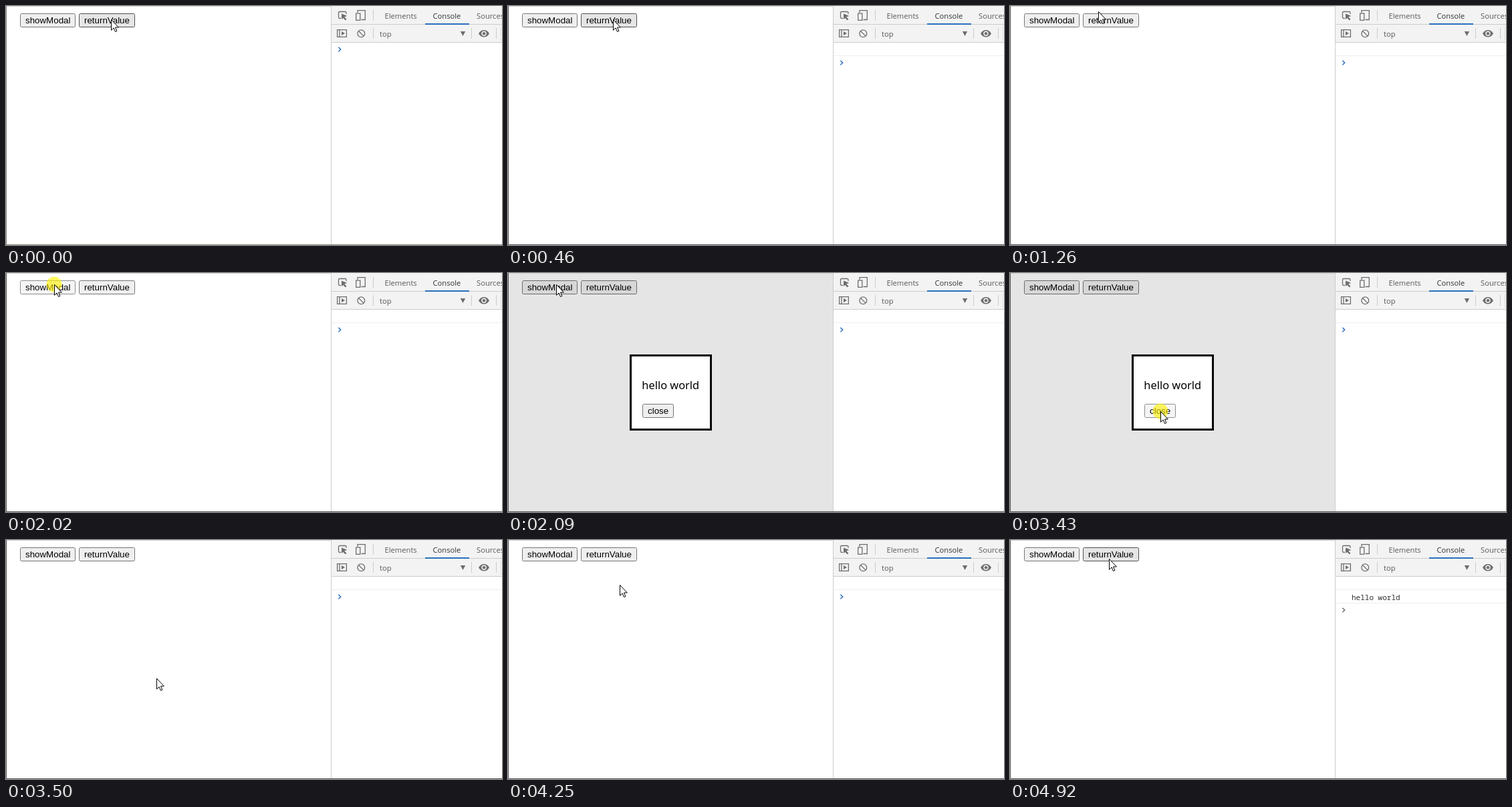
These frames come from a looping animation (742 by 358 pixels, 6.31 s). An HTML page:

```html
<!DOCTYPE html>
<html lang="en">
<head>
<meta charset="utf-8">
<title>Dialog return value</title>
<style>
  html, body { margin: 0; width: 100%; height: 100%; overflow: hidden; background: #fff; }
  svg { display: block; width: 742px; height: 358px; }
  .ui { font: 11.2px "Open Sans", "Noto Sans", sans-serif; fill: #5a5a5a; }
  .btn text { font: 13.333px "Liberation Sans", Arial, sans-serif; fill: #000; }
  .btn rect { fill: #efefef; stroke: #767676; }
  .btn.hover rect { fill: #e5e5e5; stroke: #4f4f4f; }
  .btn.active rect { fill: #f5f5f5; stroke: #8d8d8d; }
  .hello { font: 16.4px "Noto Sans", "Open Sans", sans-serif; }
  .log { font: 11px "Noto Sans Mono", "DejaVu Sans Mono", monospace; fill: #303030; }
  .icon { fill: none; stroke: #6e6e6e; stroke-width: 1.3; }
  .solid { fill: #6e6e6e; }
  .sep { stroke: #ccc; fill: none; }
</style>
</head>
<body>
<svg viewBox="0 0 742 358">
  <rect width="742" height="358" fill="#fff"/>

  <g class="btn" id="show">
    <rect x="21.5" y="11.5" width="82" height="20" rx="2"/>
    <text x="29" y="26">showModal</text>
  </g>
  <g class="btn" id="ret">
    <rect x="109.5" y="11.5" width="83" height="20" rx="2"/>
    <text x="117" y="26">returnValue</text>
  </g>

  <g id="modal">
    <rect x="1" y="1" width="485" height="356" fill="#000" opacity=".1"/>
    <rect x="183.5" y="123.5" width="120" height="111" fill="#fff" stroke="#000" stroke-width="3"/>
    <text class="hello" x="200.3" y="174">hello world</text>
    <g class="btn" id="close">
      <rect x="201.5" y="196.5" width="46" height="20" rx="2"/>
      <text x="209" y="211">close</text>
    </g>
  </g>

  <!-- developer tools -->
  <rect x="487" width="255" height="54" fill="#f3f3f3"/>
  <path class="sep" d="M487 27.5H742M487 54.5H742M486.5 0V357M549.5 6V22M549.5 33V49M696.5 33V49M733.5 33V49"/>
  <path d="M742 32.5H740.5V50.5H742" fill="#fff" stroke="#ddd"/>
  <rect x="627" y="26" width="66" height="2" fill="#2a70bd"/>
  <g class="ui">
    <text x="566.5" y="19">Elements</text>
    <text x="638.5" y="19" fill="#333">Console</text>
    <text x="704" y="19">Sources</text>
    <text x="559" y="46">top</text>
  </g>
  <path class="icon" d="M501 18.5H499Q497.5 18.5 497.5 17V10Q497.5 8.5 499 8.5H507.5Q509 8.5 509 10V12"/>
  <path class="solid" d="M502 11.5V20L504.3 18L507.8 21.5L509.5 19.8L506.2 16.4L510.3 15Z"/>
  <path class="icon" d="M526 10V6.7H537.3V20.5H531.5M523.7 11.2H529.8V21.3H523.7Z"/>
  <path class="icon" d="M495.6 35.7H509.4V46.3H495.6ZM499 35.7V46.3"/>
  <path class="solid" d="M502 38V44L507 41Z"/>
  <g class="icon" stroke-width="1.7">
    <circle cx="531.3" cy="41.3" r="5.4"/>
    <path d="M527.5 37.5L535.1 45.1"/>
  </g>
  <path class="solid" d="M679.8 38H687.2L683.5 45Z"/>
  <path class="solid" d="M707 41.2Q710 36 715 36T723 41.2Q720 46.5 715 46.5T707 41.2Z"/>
  <circle cx="715" cy="41.2" r="3.7" fill="#f3f3f3"/>
  <circle cx="715" cy="41.2" r="2.2" class="solid"/>

  <path id="row1" d="M487 74.5H742" stroke="#eee"/>
  <g id="row2">
    <path d="M487 94.5H742" stroke="#eee"/>
    <text class="log" x="511" y="90">hello world</text>
  </g>
  <path id="prompt" d="M497.3 -3.2L500.7 0L497.3 3.2" fill="none" stroke-width="1.5"/>

  <path d="M0 .5H486" stroke="#d2d2d2"/>
  <path id="edge" d="M.5 0V357.5H742" fill="none"/>

  <circle id="ring" r="11.5" fill="#fff200" opacity=".62"/>
  <path id="cursor" d="M.5 .5V16.3L4.1 12.9L6.5 18.5L8.9 17.5L6.5 12H11.4Z" fill="#fff" stroke="#000"/>
</svg>
<script>
const LOOP = 6310;
const $ = id => document.getElementById(id);
const el = {};
for (const id of ["show", "ret", "close", "modal", "row1", "row2", "prompt", "edge", "ring", "cursor"]) el[id] = $(id);

const easeOut = u => 1 - (1 - u) ** 2.9;
const smooth = u => u * u * (3 - 2 * u);

// pointer travel: start, end, number of steps, two points, sideways bow, easing
const moves = [
  { at: 1260, end: 1800, n: 9, from: [157, 20], to: [72, 17], bow: [0, -14], ease: easeOut },
  { at: 2490, end: 3030, n: 9, from: [72, 17], to: [225, 207], bow: [8, -6], ease: smooth },
  { at: 3770, end: 4390, n: 10, from: [225, 207], to: [148, 29], bow: [4, 0], ease: smooth },
  { at: 4460, end: 4460, n: 1, from: [148, 29], to: [148, 28], bow: [0, 0], ease: smooth }
];
const clicks = [[330, 400], [2020, 2090], [3430, 3500], [4790, 4860]];
const boxes = { show: [21, 11, 104, 32], ret: [109, 11, 193, 32], close: [201, 196, 248, 217] };

function pointer(t) {
  let pos = moves[0].from;
  for (const m of moves) {
    if (t < m.at) break;
    const gap = (m.end - m.at) / (m.n - 1 || 1) || 1;
    const k = Math.min(m.n, Math.floor((t - m.at) / gap + 1e-6) + 1);
    const p = m.ease(k / m.n);
    const arc = 4 * p * (1 - p);
    pos = m.from.map((a, i) => Math.round(a + (m.to[i] - a) * p + m.bow[i] * arc));
  }
  return pos;
}

const place = (node, x, y) => node.setAttribute("transform", `translate(${x} ${y})`);
const show = (node, on) => { node.style.display = on ? "" : "none"; };

function draw(t) {
  const [x, y] = pointer(t);
  const down = clicks.some(([a, b]) => t >= a && t < b);
  const open = t >= 2090 && t < 3500;
  const logs = (t >= 460) + (t >= 4920);

  place(el.cursor, x, y);
  place(el.ring, x, y);
  show(el.ring, down);
  show(el.modal, open);
  for (const id in boxes) {
    const [l, top, r, b] = boxes[id];
    const over = x >= l && x < r && y >= top && y < b && open === (id === "close");
    el[id].setAttribute("class", "btn" + (over ? (down ? " active" : " hover") : ""));
  }
  show(el.row1, logs > 0);
  show(el.row2, logs > 1);
  place(el.prompt, 0, 65 + logs * 20);
  el.prompt.setAttribute("stroke", logs > 1 ? "#6e6e6e" : "#2f6fc0");
  el.edge.setAttribute("stroke", t < 330 ? "#85857d" : "#555");
}

const start = performance.now();
function tick() {
  draw((performance.now() - start) % LOOP);
  requestAnimationFrame(tick);
}
tick();
</script>
</body>
</html>
```
